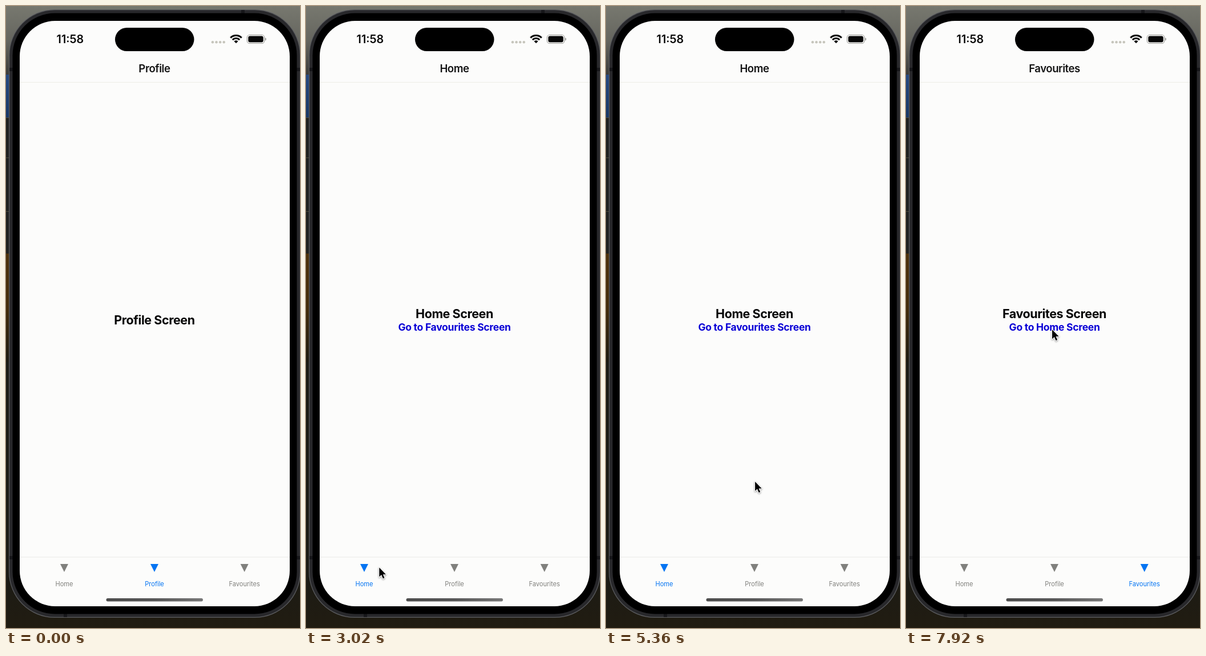
An HTML page with a canvas for the animation above (8 s loop, 515 by 1088 pixels).

```html
<!DOCTYPE html>
<html lang="en">
<head>
<meta charset="utf-8">
<title>Tab navigation</title>
<style>
html, body { margin: 0; width: 100%; height: 100%; overflow: hidden; background: #1b1913; }
canvas { display: block; width: 515px; height: 1088px; }
</style>
</head>
<body>
<canvas id="stage"></canvas>
<script>
const W = 515, H = 1088, LOOP = 8000;
const canvas = document.getElementById('stage');
const dpr = window.devicePixelRatio || 1;
canvas.width = Math.round(W * dpr);
canvas.height = Math.round(H * dpr);
const c = canvas.getContext('2d');
c.scale(dpr, dpr);

const FONT = 'Inter, "Liberation Sans", sans-serif';
const GRAY = '#80807d', BLUE = '#0474f2', LINK = '#0a00d6', PAPER = '#fcfcfb';
const TABS = [['Home', 102], ['Profile', 260], ['Favourites', 417.7]];

// cursor tip: time, x, y
const PATH = [
  [20, 520, 880], [300, 306, 935], [500, 306, 935], [1160, 118, 979],
  [1450, 103, 984], [2850, 103, 984], [3520, 259, 973], [3680, 259, 973],
  [4100, 265, 973], [5000, 265, 973], [5900, 254, 574], [6100, 254, 574],
  [6500, 256, 566], [LOOP, 256, 566]
];

function box(x, y, w, h, r, fill) {
  c.beginPath();
  c.roundRect(x, y, w, h, r);
  c.fillStyle = fill;
  c.fill();
}

function rect(x, y, w, h, fill) {
  c.fillStyle = fill;
  c.fillRect(x, y, w, h);
}

function fade(x0, y0, x1, y1, ...stops) {
  const g = c.createLinearGradient(x0, y0, x1, y1);
  stops.forEach((s, i) => g.addColorStop(i / (stops.length - 1), s));
  return g;
}

function label(str, x, y, weight, size, color, spacing = 0) {
  c.font = `${weight} ${size}px ${FONT}`;
  c.letterSpacing = spacing + 'px';
  c.textAlign = 'center';
  c.fillStyle = color;
  c.fillText(str, x + spacing / 2, y);
}

function backdrop() {
  rect(0, 0, W, H, '#1c1b15');
  rect(0, 0, W, 120, fade(0, 0, 0, 120, '#77786f', '#66665f', '#3c3c39'));
  rect(0, 120, 8, 75, fade(0, 120, 0, 195, '#274a80', '#183765'));
  rect(0, 195, 8, 238, '#20211f');
  for (const y of [195, 265, 359]) rect(0, y, 8, 1, '#4a4839');
  rect(0, 433, 8, 190, fade(0, 433, 0, 623, '#4d310a', '#442c0a', '#1d1a11'));
  rect(508, 120, 7, 700, fade(0, 120, 0, 820, '#3c3c39', '#1d1c18'));
  rect(0, 1000, W, 88, fade(0, 1000, 0, H, '#1c1b15', '#211c11'));
}

function phone() {
  box(5, 6, 511, 1064, 80, '#5c5d60');
  box(6.2, 7.2, 508.6, 1061.6, 79, '#28282b');
  const notch = '#17171a';
  for (const y of [108, 962]) {
    rect(6, y, 6, 6, notch);
    rect(509, y, 6, 6, notch);
  }
  rect(412, 7, 6, 6, notch);
  rect(101, 1063, 6, 6, notch);
  box(11.5, 12.5, 498, 1051, 74, '#000');
  box(24, 26, 473, 1024, 62, PAPER);
  box(191, 38, 138.5, 41, 20.5, '#000');
}

function statusBar() {
  label('11:58', 112.4, 65.3, 600, 19.7, '#080808');
  for (let i = 0; i < 4; i++) box(359.7 + i * 6.6, 61, 4.5, 4.5, 2.2, '#c6c5bc');

  c.fillStyle = c.strokeStyle = '#080808';
  c.lineWidth = 3;
  const a = -Math.PI * 0.75, b = -Math.PI * 0.25;
  c.beginPath();
  c.moveTo(403, 65.3);
  c.arc(403, 65.3, 5, a, b);
  c.fill();
  for (const r of [8.8, 13.7]) {
    c.beginPath();
    c.arc(403, 65.3, r, a, b);
    c.stroke();
  }

  c.beginPath();
  c.roundRect(422.3, 50.5, 30.4, 15, 4.6);
  c.lineWidth = 1.1;
  c.strokeStyle = '#9b9b96';
  c.stroke();
  box(424.3, 52.4, 26.4, 11.2, 3, '#080808');
  box(453.9, 55.5, 1.8, 5, [0, 2, 2, 0], '#9b9b96');
}

function tabBar(active) {
  rect(24, 963.5, 473, 1, '#ececE8');
  TABS.forEach(([name, x], i) => {
    const color = i === active ? BLUE : GRAY;
    c.beginPath();
    c.moveTo(x - 7, 976);
    c.lineTo(x + 7, 976);
    c.lineTo(x, 990);
    c.closePath();
    c.fillStyle = color;
    c.fill();
    label(name, x, 1014.5, 400, 11.1, color);
  });
  box(175.5, 1036, 169.5, 5.5, 2.75, fade(176, 0, 345, 0, '#4c4c4c', '#575757', '#777'));
}

function page(active) {
  const name = TABS[active][0];
  label(name, 260.2, 116.2, 600, 18.6, '#141414', -0.45);
  rect(24, 133, 473, 1, '#ededE6');
  const title = name + ' Screen';
  if (active === 1) {
    label(title, 260.2, 556.6, 700, 21.5, '#060606', -0.45);
    return;
  }
  const other = TABS[2 - active][0];
  label(title, 260.2, 546, 700, 21.5, '#060606', -0.45);
  label(`Go to ${other} Screen`, 260.2, 568.3, 700, 17.5, LINK, -0.27);
}

function pointer(x, y) {
  c.save();
  c.translate(x, y);
  c.beginPath();
  [[0, 0], [0, 16.4], [3.8, 12.9], [6.6, 19.3], [9.2, 18.1], [6.5, 12], [11.7, 12]]
    .forEach(([px, py]) => c.lineTo(px, py));
  c.closePath();
  c.lineJoin = 'round';
  c.lineWidth = 2.2;
  c.strokeStyle = '#fff';
  c.shadowColor = 'rgba(0,0,0,.4)';
  c.shadowBlur = 3 * dpr;
  c.shadowOffsetY = 1.2 * dpr;
  c.stroke();
  c.shadowColor = 'transparent';
  c.fillStyle = '#000';
  c.fill();
  c.restore();
}

function pointerAt(t) {
  const i = PATH.findIndex(k => k[0] > t);
  const [t0, x0, y0] = PATH[i - 1], [t1, x1, y1] = PATH[i];
  const u = (t - t0) / (t1 - t0), e = u * u * (3 - 2 * u);
  return [x0 + (x1 - x0) * e, y0 + (y1 - y0) * e];
}

function draw(t) {
  const active = t < 1700 ? 1 : t < 6700 ? 0 : 2;
  backdrop();
  phone();
  statusBar();
  page(active);
  tabBar(active);
  if (t >= PATH[0][0]) pointer(...pointerAt(t));
}

const start = performance.now();
function tick() {
  draw((performance.now() - start) % LOOP);
  requestAnimationFrame(tick);
}
tick();
</script>
</body>
</html>
```
